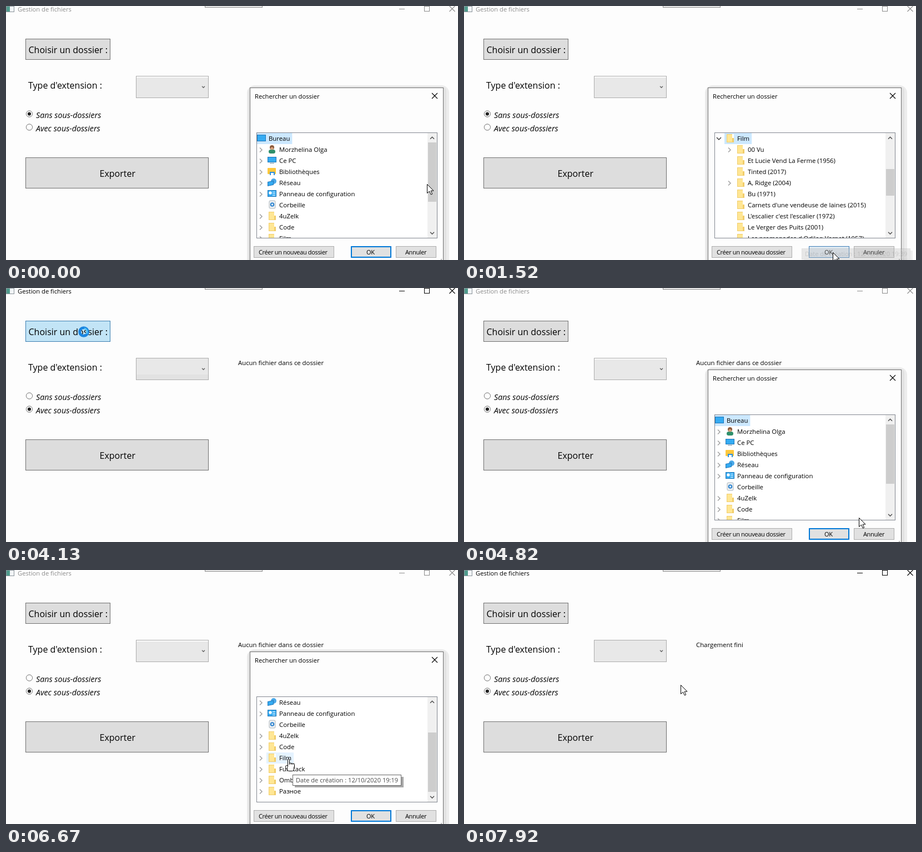
Recreate the animation shown at these times as an HTML page with a canvas. Size 814x458 px, loop 8000 ms.

```html
<!DOCTYPE html>
<html lang="fr">
<head>
<meta charset="utf-8">
<title>Gestion de fichiers</title>
<style>
html, body { margin: 0; width: 100%; height: 100%; overflow: hidden; background: #fdfdfd; }
canvas { display: block; }
</style>
</head>
<body>
<canvas id="stage" width="814" height="458"></canvas>
<script>
const g = document.getElementById('stage').getContext('2d');
const LOOP = 8000, STEP = 136.6, LAST = 58;
const FONT = '"Open Sans", "Noto Sans", sans-serif';
const ROW = 20, TREE_TOP = 229;

const roots = [
  ['Bureau', 'desk'], ['Morzhelina Olga', 'user'], ['Ce PC', 'pc'], ['Bibliothèques', 'lib'],
  ['Réseau', 'net'], ['Panneau de configuration', 'panel'], ['Corbeille', 'bin'],
  ['4uZelk'], ['Code'], ['Film'], ['FullStack'], ['Ombre'], ['Разное']
];
const films = [
  'Film', '00 Vu', 'Et Lucie Vend La Ferme (1956)', 'Tinted (2017)', 'A, Ridge (2004)', 'Bu (1971)',
  "Carnets d'une vendeuse de laines (2015)", "L'escalier c'est l'escalier (1972)",
  'Le Verger des Puits (2001)', 'Les promenades d Odilon Varnet (1957)'
];

// The folder dialog is used twice, in the same way
const SECOND = 41;
const spot = (x, y) => ({ x, y });
const film = spot(509, 341), ok = spot(664, 444), choose = spot(138, 78);
const visit = n => [
  [n + 1, spot(758, 321)], [n + 4, spot(760, 370)], [n + 8, film], [n + 9, film], [n + 11, ok], [n + 15, ok]
];
const path = [
  ...visit(0), [21, spot(180, 206)], [22, spot(56, 220)], [25, spot(44, 214)], [29, choose], [32, choose],
  [35, spot(711, 414)], [37, spot(778, 424)], ...visit(SECOND), [LAST, spot(390, 207)]
];

const ease = u => u * u * (3 - 2 * u);

function pointer(n) {
  const i = path.findIndex(stop => stop[0] >= n);
  if (i < 1) return path[0][1];
  const [from, a] = path[i - 1], [to, b] = path[i];
  const u = ease((n - from) / (to - from));
  return spot(Math.round(a.x + (b.x - a.x) * u), Math.round(a.y + (b.y - a.y) * u));
}

function box(x, y, w, h, fill) {
  g.fillStyle = fill;
  g.fillRect(x, y, w, h);
}

function frame(x, y, w, h, fill, edge, t = 1) {
  box(x, y, w, h, edge);
  box(x + t, y + t, w - 2 * t, h - 2 * t, fill);
}

function paint(fill, edge, width = 1) {
  if (fill) {
    g.fillStyle = fill;
    g.fill();
  }
  if (edge) {
    g.strokeStyle = edge;
    g.lineWidth = width;
    g.stroke();
  }
}

function disc(x, y, r, fill, edge, width) {
  g.beginPath();
  g.arc(x, y, r, 0, 2 * Math.PI);
  paint(fill, edge, width);
}

function round(x, y, w, h, r, fill, edge) {
  g.beginPath();
  g.roundRect(x, y, w, h, r);
  paint(fill, edge);
}

function text(s, x, y, { size = 11.35, color = '#000', style = '', gap = 0 } = {}) {
  g.font = `${style} ${size}px ${FONT}`;
  g.letterSpacing = gap + 'px';
  g.fillStyle = color;
  g.fillText(s, x, y);
  return g.measureText(s).width;
}

function cross(x, y, r, color) {
  g.beginPath();
  for (const s of [-1, 1]) {
    g.moveTo(x - r, y - r * s);
    g.lineTo(x + r, y + r * s);
  }
  paint(null, color, 1.1);
}

// Points right, then turned clockwise by quarter turns
function chevron(x, y, turns, r, color, width = 1.5) {
  g.save();
  g.translate(x, y);
  g.rotate(turns * Math.PI / 2);
  g.beginPath();
  g.moveTo(-r / 2, -r);
  g.lineTo(r / 2, 0);
  g.lineTo(-r / 2, r);
  paint(null, color, width);
  g.restore();
}

function screen(x, y, w, h) {
  frame(x, y, w, h, '#35abf2', '#1f76b8');
}

const icons = {
  folder() {
    box(2, 1, 13, 15, '#f1cd6b');
    box(3, 2, 9, 13, '#ffe694');
    box(12, 1, 3, 7, '#fff');
  },
  desk() { screen(0, 2, 16, 12); },
  user() {
    round(2, 9, 12, 7, 4, '#2f8f6b');
    disc(8, 5, 4, '#8a5a3c');
    disc(8, 7, 2.5, '#d9a47e');
  },
  pc() {
    screen(0, 2, 16, 10);
    box(4, 13, 8, 1, '#6f8ca3');
  },
  lib() {
    round(0, 2, 15, 11, 1, '#ffc83d');
    box(4, 9, 9, 6, '#2d8fdd');
    box(6, 11, 5, 4, '#fff');
  },
  net() {
    disc(11, 6, 5, '#4aa8e8');
    g.transform(1, -0.2, 0, 1, 0, 2);
    screen(0, 5, 11, 8);
  },
  panel() {
    screen(0, 2, 16, 12);
    disc(5, 7, 2.7, '#fff');
    for (const y of [5, 8, 11]) box(9, y, 5, 1, '#fff');
  },
  bin() {
    round(3, 1, 11, 14, 2, '#eef1f3', '#a9b3ba');
    disc(8.5, 8, 2.8, null, '#2d83cf', 2);
  }
};

function icon(name, x, y) {
  g.save();
  g.translate(x, y);
  icons[name]();
  g.restore();
}

function mainWindow(n, active) {
  box(0, 0, 814, 458, '#fdfdfd');
  const ink = active ? '#000' : '#8c8c8c';
  frame(0, 0, 15, 11, '#f2f5f7', '#8a9299');
  box(1, 1, 6, 9, '#4f9b8c');
  text('Gestion de fichiers', 21, 10, { size: 11.2, color: ink });
  frame(358, -4, 104, 7, '#ececec', '#8b8b8b');
  box(708, 5, 10, 1, ink);
  frame(753, 0, 10, 10, '#fdfdfd', ink);
  cross(803.5, 5, 5, ink);

  const hot = n >= 28 && n < 32;
  frame(35, 59, 153, 38, hot ? '#c2e4f6' : '#dddddd', hot ? '#3c7fb1' : '#707070');
  text('Choisir un dossier :', 40.5, 85, { size: 16 });
  text("Type d'extension :", 40, 149, { size: 16 });

  frame(234, 126, 131, 40, '#e8e8e8', '#acacac');
  if (!active) box(235, 127, 129, 2, '#fafafa');
  else if (n < 55) box(235, 156, 129, 9, '#e2e2e2');
  chevron(355.5, 146, 1, 2.5, '#606060', 1.3);

  const chosen = n < 24 ? 0 : 1;
  ['Sans', 'Avec'].forEach((word, i) => {
    const y = 194.5 + 24 * i;
    disc(42, y, 5.6, '#fff', '#707070');
    if (i === chosen) disc(42, y, 3.1, '#212121');
    text(word + ' sous-dossiers', 54, y + 7.5, { size: 14.3, style: 'italic' });
  });

  frame(35, 273, 330, 56, '#dddddd', '#707070');
  text('Exporter', 168.5, 308, { size: 16 });

  if (n >= 15) text(n < 56 ? 'Aucun fichier dans ce dossier' : 'Chargement fini', 418, 139);
}

// Returns whether the pointer is over the row
function row(label, name, level, y, { selected, child, open }, p) {
  const left = 452 + 19 * level, tx = left + 21;
  g.font = `11.35px ${FONT}`;
  g.letterSpacing = '0px';
  const right = tx + g.measureText(label).width + 4;
  const over = p.x >= left && p.x < right && p.y >= y && p.y < y + ROW && p.y < 418;
  if (selected || over) box(left - 2, y, right - left + 2, ROW, selected ? '#cce8ff' : '#e5f3ff');
  if (open) chevron(left - 12, y + 10, 1, 4, '#404040');
  else if (child) chevron(left - 12, y + 10.5, 0, 4, '#a0a0a0');
  icon(name, left, y + 1);
  text(label, tx, y + 14);
  return over;
}

function tree(k, p) {
  const open = k >= 9;
  const top = Math.round(4 * ease(Math.min(1, Math.max(0, (k - 1) / 3))));
  let over = false;
  frame(451, 228, 326, 191, '#fff', '#828790');
  g.save();
  g.beginPath();
  g.rect(452, TREE_TOP, 307, 189);
  g.clip();
  const items = open ? films.map(f => [f]) : roots.slice(top, top + 10);
  items.forEach(([label, name = 'folder'], i) => {
    const first = label === (open ? 'Film' : 'Bureau');
    const state = {
      selected: first,
      open: open && first,
      child: open ? i === 1 || i === 4 : !first && name !== 'bin'
    };
    const level = (first ? 0 : 1) + (open ? 1 : 0);
    if (row(label, name, level, TREE_TOP + i * ROW, state, p)) over = true;
  });
  g.restore();

  box(759, TREE_TOP, 17, 189, '#f0f0f0');
  chevron(767.5, 238, 3, 3.5, '#505050');
  chevron(767.5, 409.5, 1, 3.5, '#505050');
  const shade = k >= 2 && k <= 4 ? '#606060' : k >= -2 && k < 0 ? '#a6a6a6' : '#cdcdcd';
  if (open) box(760, 294, 15, 48, shade);
  else box(760, Math.round(246 + top * 11.75), 15, 107, shade);
  return over;
}

function button(label, x, w, tx, edge = '#adadad', t = 1, fill = '#e1e1e1') {
  frame(x, 433, w, 21, fill, edge, t);
  text(label, tx, 448, { size: 11, gap: -0.35 });
}

function dialog(k, p) {
  round(434, 143, 364, 400, 14, '#ececec');
  round(436, 145, 357, 400, 9, '#e2e2e2');
  frame(439, 147, 349, 340, '#fdfdfd', '#6f6f6f');
  text('Rechercher un dossier', 448, 167, { size: 11.2 });
  cross(772, 162, 5, '#000');
  const over = tree(k, p);

  button('Créer un nouveau dossier', 446, 145, 455);
  if (p.x > 621 && p.x < 694 && p.y > 433) button('OK', 621, 73, 649, '#3f7fb8', 1, '#dfe9f1');
  else button('OK', 621, 73, 649, '#0078d7', 2);
  button('Annuler', 702, 73, 719);
  box(783, 456, 2, 2, '#bdbdbd');
  return over;
}

function tooltip(x, y, time, alpha) {
  g.save();
  g.globalAlpha = alpha;
  box(x + 4, y + 20, 196, 3, '#a8a8a8');
  box(x + 196, y + 4, 4, 16, '#a8a8a8');
  frame(x, y, 196, 20, '#fff', '#666');
  text('Date de création : 12/10/2020 ' + time, x + 6, y + 14, { size: 11.1, color: '#4a4a4a' });
  g.restore();
}

function arrow(x, y) {
  g.beginPath();
  [[0, 0], [0, 16], [4, 12.5], [6.8, 18.5], [9.2, 17.5], [6.6, 11.6], [11.5, 11.6]]
    .forEach(([dx, dy]) => g.lineTo(x + 0.5 + dx, y + 0.5 + dy));
  g.closePath();
  paint('#fff', '#000');
}

function hand(x, y) {
  round(x - 5.5, y + 11.5, 6, 6, 2, '#fff', '#000');
  round(x - 1.5, y - 0.5, 3, 14, 1.5, '#fff', '#000');
  for (let i = 1; i < 4; i++) round(x - 1.5 + 3 * i, y + 6.5 + i / 2, 3, 8, 1.5, '#fff', '#000');
  round(x - 2.5, y + 12.5, 12, 9, 3, '#fff', '#000');
  box(x - 1, y + 10, 10, 5, '#fff');
}

function busy(x, y, n) {
  disc(x, y, 7.3, null, '#1b86e0', 5);
  g.beginPath();
  g.arc(x, y, 6, n, n + 2);
  paint(null, '#55c4f7', 3);
}

function draw(t) {
  const n = Math.min(LAST, Math.floor((t + 25) / STEP));
  const k = n < 27 ? n : n - SECOND;
  const open = k < 15 && (n < 15 || n >= 32);
  const p = pointer(n);
  mainWindow(n, !open);
  const over = open && dialog(k, p);
  if (n === 49) tooltip(516, 369, '19:19', 1);
  if (n >= 11 && n < 13) tooltip(608, 437, '19:39', 0.09 * (13 - n));
  if (n === 30 || n === 31) busy(140, 79, n);
  else if (over) hand(p.x, p.y);
  else arrow(p.x, p.y);
}

const start = performance.now();
function tick() {
  draw((performance.now() - start) % LOOP);
  requestAnimationFrame(tick);
}
tick();
</script>
</body>
</html>
```
